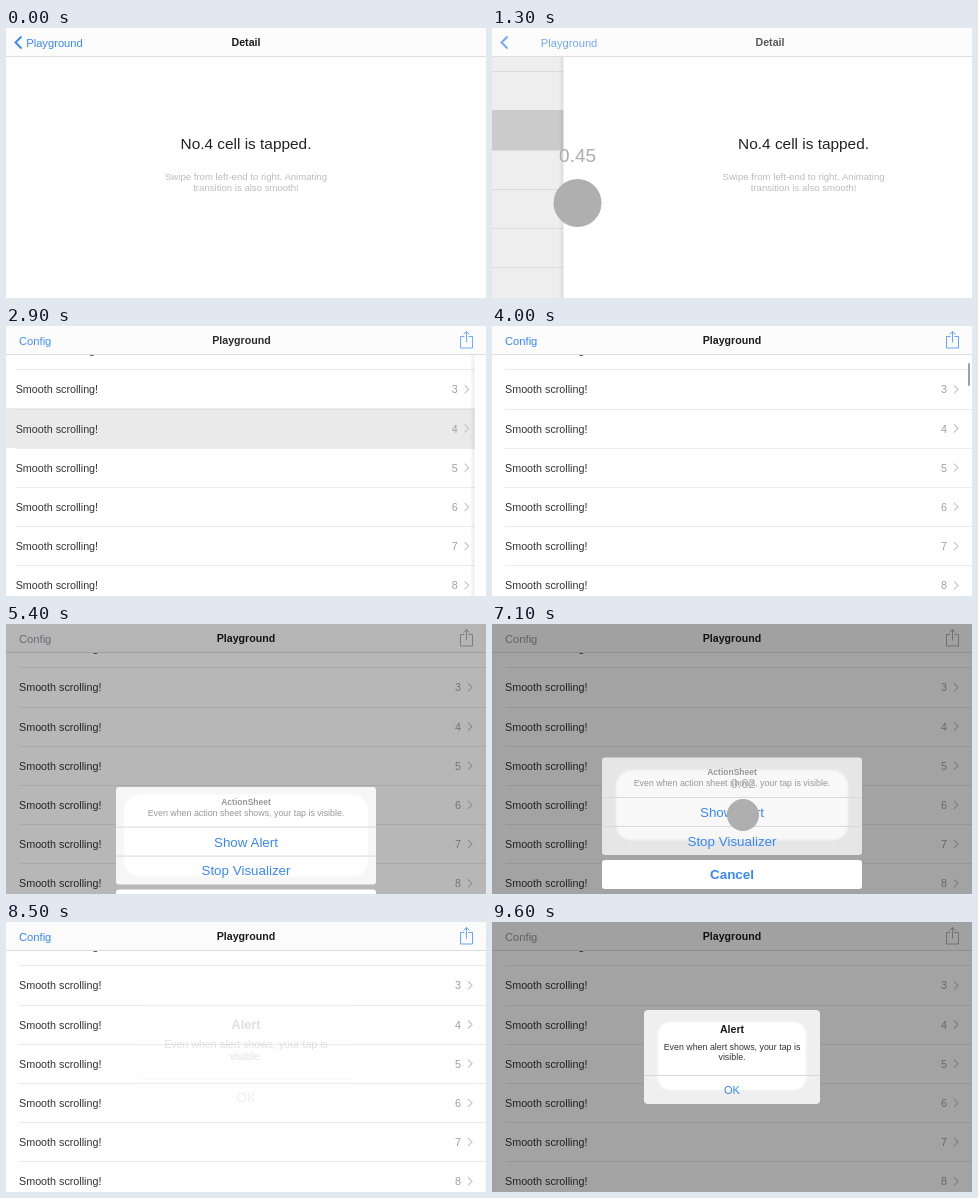
Write an HTML page that moves like this. It is 480 by 270 pixels and loops after 9700 ms.

```html
<!DOCTYPE html>
<html lang="en">
<head>
<meta charset="utf-8">
<title>Touch demo</title>
<style>
  html, body { margin: 0; width: 100%; height: 100%; overflow: hidden; background: #fff; }
  svg { display: block; width: 100vw; height: 100vh; }
  text { font: 10.75px "Liberation Sans", Arial, sans-serif; fill: #333; }
  .mid { text-anchor: middle; }
  .title { font-size: 10.65px; font-weight: bold; fill: #1c1c1c; }
  .nav { font-size: 11.2px; }
  .blue { fill: #3a88f2; }
  .stroke { fill: none; stroke: #3a88f2; }
  .num { fill: #a0a0a4; }
  .head { font-size: 15.4px; fill: #222; }
  .hint { font-size: 9.6px; fill: #bcbcbc; }
  .note { font-size: 8.85px; fill: #989898; }
  .dark { fill: #333; }
  .button { font-size: 13.4px; }
  .strong { font-weight: bold; }
  .line { stroke: #ebebeb; }
  .glow { fill: #fff; filter: blur(1px); }
</style>
</head>
<body>
<svg viewBox="0 0 480 270">
  <defs>
    <linearGradient id="shade">
      <stop offset="0" stop-opacity="0"/>
      <stop offset="1" stop-opacity=".08"/>
    </linearGradient>
  </defs>
  <rect width="480" height="270" fill="#fff"/>

  <g id="list"></g>
  <rect id="listDim" width="480" height="270"/>

  <g id="page">
    <rect x="-5" width="5" height="270" fill="url(#shade)"/>
    <rect width="480" height="270" fill="#fff"/>
    <text class="mid head" x="240" y="115.5" dy=".36em">No.4 cell is tapped.</text>
    <text class="mid hint" x="240" y="149" dy=".36em">Swipe from left-end to right. Animating</text>
    <text class="mid hint" x="240" y="160" dy=".36em">transition is also smooth!</text>
  </g>

  <rect width="480" height="28" fill="#fcfcfc"/>
  <path d="M0 28.5H480" stroke="#dedede"/>
  <g id="back">
    <path class="stroke" stroke-width="1.9" d="M15.5 8.5L9.5 14.5L15.5 20.5"/>
  </g>
  <text id="backLabel" class="mid nav blue" y="14.5" dy=".36em">Playground</text>
  <text id="listTitle" class="mid title" y="14.5" dy=".36em">Playground</text>
  <text id="pageTitle" class="mid title" y="14.5" dy=".36em">Detail</text>
  <g id="items">
    <text id="config" class="nav" x="13" y="14.5" dy=".36em">Config</text>
    <path id="share" fill="none" stroke-width=".75" d="M458.5 10.5H454.5V22H466.5V10.5H462.5M460.5 16.5V5.5M457.5 8.5L460.5 5.5L463.5 8.5"/>
  </g>
  <rect id="indicator" x="476" y="37" width="2" height="23" rx="1" fill="#a0a0a0"/>

  <rect id="dim" width="480" height="270"/>

  <g id="sheet">
    <rect id="sheetBack" x="110" y="133.5" width="260" height="97.5" rx="3"/>
    <rect id="sheetGlow" class="glow" rx="16"/>
    <path stroke="#d9d9d9" d="M110 173.5H370M110 202.5H370"/>
    <text class="mid note strong" x="240" y="148" dy=".36em" style="font-size:8.5px">ActionSheet</text>
    <text class="mid note" x="240" y="159" dy=".36em">Even when action sheet shows, your tap is visible.</text>
    <text class="mid button blue" x="240" y="188.5" dy=".36em">Show Alert</text>
    <text class="mid button blue" x="240" y="217" dy=".36em">Stop Visualizer</text>
    <rect x="110" y="236" width="260" height="29" rx="3" fill="#fff"/>
    <text class="mid button blue strong" x="240" y="250.5" dy=".36em">Cancel</text>
  </g>

  <g id="alert">
    <rect id="alertBack" x="152" y="88" width="176" height="94" rx="4"/>
    <rect class="glow" x="166" y="100" width="148" height="68" rx="12"/>
    <path stroke="#d8d8d8" d="M152 153.5H328"/>
    <text class="mid title" x="240" y="107.5" dy=".36em">Alert</text>
    <text class="mid note dark" x="240" y="124.5" dy=".36em">Even when alert shows, your tap is</text>
    <text class="mid note dark" x="240" y="134.5" dy=".36em">visible.</text>
    <text id="ok" class="mid" x="240" y="168.5" dy=".36em" style="font-size:11.1px">OK</text>
  </g>

  <g id="touch">
    <circle r="24" fill="#afafaf"/>
    <text id="timer" class="mid" y="-48" dy=".36em" style="font-size:19px;fill:#adadad"></text>
  </g>
</svg>
<script>
const LOOP = 9700, STEP = 100, ROW = 39.2;
const $ = id => document.getElementById(id);
const set = (id, attrs) => {
  for (const key in attrs) $(id).setAttribute(key, attrs[key]);
};
const clamp = v => Math.min(1, Math.max(0, v));
const ramp = (t, from, to) => clamp((t - from) / (to - from));
const smooth = u => u * u * (3 - 2 * u);
const easeOut = u => 1 - (1 - u) ** 2;
const gray = v => `rgb(${v},${v},${v})`;
const tint = grayness => `color-mix(in srgb, #3a88f2, #969696 ${grayness * 100}%)`;

function rowMarkup(n) {
  const y = 63.5 + ROW * (n - 3), bottom = Math.floor(y + ROW / 2) + .5;
  return `${n === 4 ? '<rect id="selected" y="82" width="480" height="40" fill="#d9d9d9"/>' : ''}
    <text x="13" y="${y}" dy=".36em">Smooth scrolling!</text>
    <text class="mid num" x="452" y="${y}" dy=".36em">${n}</text>
    <path fill="none" stroke="#c4c4c9" stroke-width="1.1" d="M462 ${y - 4.2}l4 4l-4 4"/>
    <path class="line" d="M13 ${bottom}H480"/>`;
}
$('list').innerHTML = [2, 3, 4, 5, 6, 7, 8].map(rowMarkup).join('');

// Left edge of the detail page: a short cancelled swipe, then a full one.
function pageEdge(t) {
  if (t < 450) return 85 * ramp(t, 50, 450);
  if (t < 850) return 85 * (1 - easeOut(ramp(t, 450, 800)));
  if (t < 1100) return 25 * ramp(t, 850, 1100);
  if (t < 2200) return 25 + 256 * ramp(t, 1100, 2200);
  if (t < 2650) return 281 + 119 * ramp(t, 2200, 2650);
  return 400 + 80 * easeOut(ramp(t, 2650, 3050));
}

const followEdge = t => [pageEdge(t) + 14, 175];
const touches = [
  { down: 50, up: 450, at: followEdge },
  { down: 850, up: 2650, at: followEdge },
  { down: 5080, up: 5180, at: () => [460, 14] },
  { down: 6430, up: 7050, at: () => [251, 191] }
];
const FADE = 150;

function drawNavigation(t, dimmed) {
  const edge = pageEdge(t), p = edge / 480;
  const arriving = p ** 3, leaving = (1 - p) ** 2;
  set('list', { transform: `translate(${-144 * (1 - p)})` });
  set('listDim', { opacity: .08 * (1 - p) });
  set('page', { transform: `translate(${edge})`, visibility: p < 1 ? 'visible' : 'hidden' });
  set('selected', { x: 144 * (1 - p), opacity: 1 - ramp(t, 2650, 3200) });
  const x = 48.5 + 191.5 * p;
  set('back', { opacity: leaving });
  set('backLabel', { x, opacity: clamp(1 - 2 * p) });
  set('listTitle', { x, opacity: arriving });
  set('pageTitle', { x: 240 + 255 * p, opacity: leaving });
  set('items', { opacity: arriving });
  $('config').style.fill = $('share').style.stroke = tint(easeOut(dimmed));
  set('indicator', { opacity: ramp(t, 3000, 3100) * (1 - ramp(t, 4350, 4700)) });
}

function drawSheet(t, shown) {
  const settle = ramp(t, 5400, 6000), inset = 8 + 6 * settle;
  set('sheet', {
    transform: `translate(0 ${137 * (1 - shown)})`,
    visibility: shown > 0 ? 'visible' : 'hidden'
  });
  set('sheetBack', { fill: gray(246 - 16 * settle) });
  set('sheetGlow', {
    x: 110 + inset, y: 133 + inset - settle, opacity: 1 - .25 * settle,
    width: 260 - 2 * inset, height: 82 - 12 * settle
  });
}

function drawAlert(t, pop) {
  set('alert', {
    opacity: ramp(t, 8440, 8900),
    transform: `translate(240 135) scale(${1.2 - .2 * pop}) translate(-240 -135)`
  });
  set('alertBack', { fill: gray(255 - 16 * pop) });
  $('ok').style.fill = tint(1 - pop);
}

function drawTouch(t) {
  const touch = touches.find(({ down, up }) => t >= down && t < up + FADE);
  set('touch', { visibility: touch ? 'visible' : 'hidden' });
  if (!touch) return;
  const end = Math.min(t, touch.up), scale = 1 - ramp(t, touch.up, touch.up + FADE);
  set('touch', { transform: `translate(${touch.at(end)}) scale(${scale})` });
  $('timer').textContent = ((end - touch.down) / 1000).toFixed(2);
}

function draw(t) {
  const sheet = easeOut(ramp(t, 5150, 5617)) * (1 - smooth(ramp(t, 7400, 7850)));
  const pop = smooth(ramp(t, 8480, 8900));
  const dimmed = Math.max(sheet, pop);
  drawNavigation(t, dimmed);
  set('dim', { opacity: .36 * dimmed });
  drawSheet(t, sheet);
  drawAlert(t, pop);
  drawTouch(t);
}

let start;
function frame(now) {
  start ??= now;
  draw(Math.floor((now - start) % LOOP / STEP) * STEP);
  requestAnimationFrame(frame);
}
draw(0);
requestAnimationFrame(frame);
</script>
</body>
</html>
```
